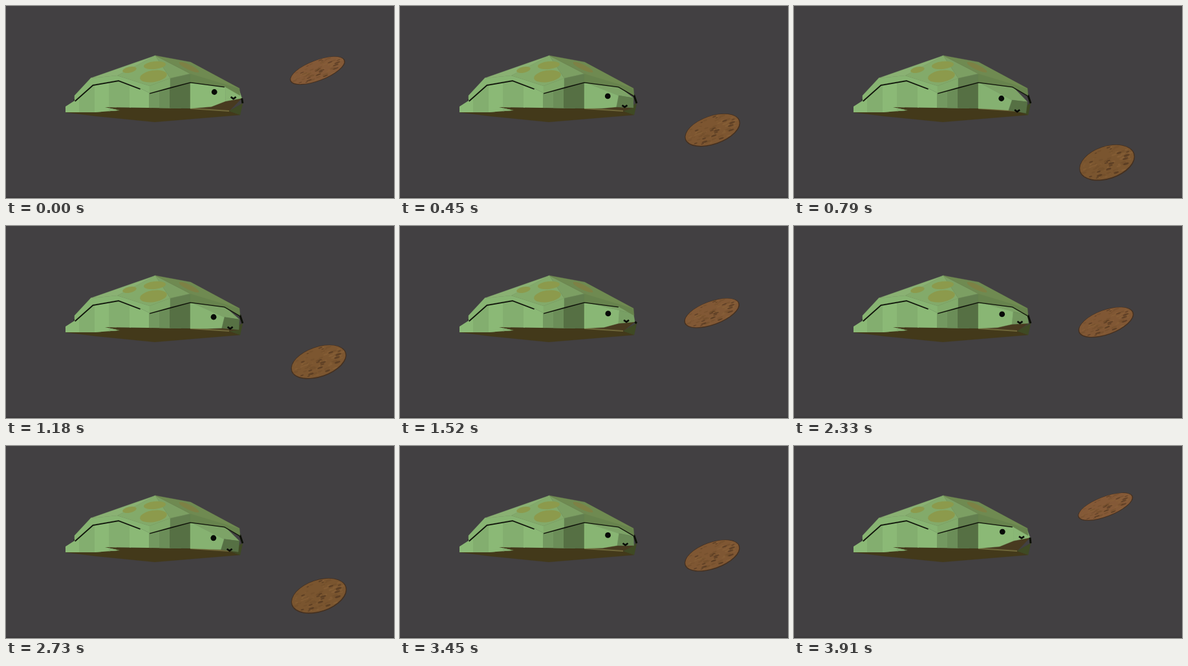
An HTML page with a canvas that plays this animation: 600x298 px, repeating every 3.94 s.

```html
<!DOCTYPE html>
<html>
<head>
<meta charset="utf-8">
<style>
html, body { margin: 0; width: 100%; height: 100%; overflow: hidden; background: #424042; }
canvas { display: block; }
</style>
</head>
<body>
<canvas id="stage" width="600" height="298"></canvas>
<script>
const g = document.getElementById('stage').getContext('2d');
const LOOP = 3940, PERIOD = 2075, LOWEST = 858;

// Corners of the low-poly turtle
const P = {
  apex: [231, 77], ridge: [285, 87], brink: [361, 128], end: [362, 139],
  crown: [188, 92], flank: [131, 112], back: [106, 139], backLow: [106, 147],
  fold: [172, 108], mid: [222, 124], midLow: [222, 135], joint: [254, 112], jointLow: [254, 126],
  front: [285, 105], frontLow: [285, 118], rim: [338, 125], bend: [134, 122], arch: [174, 115],
  slit: [208, 128], beak: [366, 151],
  tail: [92, 156], tailLow: [92, 165], hand: [136, 165], palm: [176, 162], notch: [153, 157],
  neck: [285, 159], belly: [230, 180], hip: [140, 171], chin: [362, 169], jaw: [345, 163]
};

const mix = (a, b, k) => a + (b - a) * k;
const clamp = v => Math.max(0, Math.min(1, v));
const blend = (a, b, k) => a.map((v, i) => mix(v, b[i], k));
const rgb = (a, b, k) => `rgb(${blend(a, b, clamp(k)).map(Math.round)})`;
const LIGHT = [139, 185, 118], DARK = [86, 112, 68];

function outline(names) {
  g.beginPath();
  for (const n of names.split(' ')) g.lineTo(...P[n]);
}

function face(color, names) {
  outline(names);
  g.closePath();
  g.fillStyle = g.strokeStyle = color;
  g.lineWidth = 0.4;
  g.fill();
  g.stroke();
}

function line(color, width, names) {
  outline(names);
  g.strokeStyle = color;
  g.lineWidth = width;
  g.stroke();
}

function oval(color, x, y, rx, ry, turn = 0) {
  g.fillStyle = color;
  g.beginPath();
  g.ellipse(x, y, rx, ry, turn, 0, 7);
  g.fill();
}

function body() {
  face('#43391a', 'tailLow notch neck jaw chin belly hip');
  g.save();
  outline('tail backLow bend arch slit midLow frontLow neck notch palm hand tailLow');
  g.clip();
  // upright facets, darker towards the neck
  [92, 114, 138, 160, 192, 222, 238, 254].forEach((x, i) => {
    g.fillStyle = rgb(LIGHT, DARK, i % 2 * 0.15 + Math.max(0, i - 4) * 0.3);
    g.fillRect(x - 1, 110, 34, 60);
  });
  g.restore();
}

function head(p) {
  const move = (name, x0, y0, x1, y1) => P[name] = [mix(x0, x1, p), mix(y0, y1, p)];
  move('brow', 340, 125, 337, 145);
  move('snout', 361, 131, 361, 148);
  move('lip', 365, 142, 359, 165);
  move('corner', 340, 147, 332, 161);
  move('cheek', 318, 156, 310, 160);
  const eye = move('eye', 322.3, 133, 320.8, 143), [x, y] = move('nose', 352, 143, 345.5, 163);

  face('#3f4a24', 'jaw beak chin');
  face('#483a20', 'neck corner lip jaw');
  line('#6f683a', 2, 'neck jaw');
  face('#7da367', 'frontLow rim snout brow');
  face(rgb(LIGHT, DARK, p * 1.2), 'brow snout lip corner');
  face(rgb(LIGHT, DARK, p * 0.1), 'frontLow brow corner cheek neck');
  oval('#080a07', ...eye, 4.4, 4.4);
  g.strokeStyle = '#080a07';
  g.lineWidth = 2.7;
  g.beginPath();
  for (const d of [-4, 0, 4]) g.lineTo(x + d, y - Math.abs(d) * 0.7);
  g.stroke();
}

function shell(p) {
  line('#0d1008', 4, 'backLow bend arch slit');
  line('#0d1008', 3, 'midLow frontLow rim');
  line('#0d1008', 3, p < 0.3 ? 'lip beak' : 'rim end beak');
  face('#87b472', 'back flank fold mid midLow slit arch bend backLow');
  face('#82ab6b', 'mid joint jointLow midLow');
  face('#637f4f', 'joint front frontLow jointLow');
  face('#67834d', 'front ridge brink end rim frontLow');
  face('#83aa6a', 'apex joint mid fold');
  face('#8ab173', 'apex fold flank crown');
  face('#7c9f63', 'apex front joint');
  face('#6f8a51', 'apex ridge brink front');
  oval('#8c9a4c', 230, 92, 17, 6, -0.1);
  oval('#8c9a4c', 228, 109, 21, 9, -0.15);
  oval('#8c9a4c', 191, 99, 11, 4.5, -0.2);
  oval('#7d8145', 283, 95, 17, 4, 0.45);
}

function cookie(y, p) {
  let seed = 11;
  const rnd = () => (seed = seed * 16807 % 2147483647) / 2147483647;
  g.save();
  g.translate(mix(481.6, 484, p), y);
  g.rotate(mix(-0.366, -0.325, p));
  g.scale(mix(45.2, 44.6, p), mix(15.6, 25.2, p));
  oval('#443020', 0, 0, 1, 1);
  oval(rgb([132, 89, 55], [122, 85, 47], p), 0, -0.02, 0.97, 0.95);
  g.globalAlpha = 0.5;
  for (let i = 0; i < 90; i++) {
    const a = rnd() * 6.283, r = Math.sqrt(rnd()) * 0.88, s = 0.02 + rnd() * 0.05;
    oval(i < 40 ? '#8c633a' : i < 70 ? '#6e4c2a' : '#3f2a1a', r * Math.cos(a), r * Math.sin(a), s * 1.6, s);
  }
  g.restore();
}

function frame(now) {
  const t = now % LOOP;
  // swings up and down while sinking slightly
  const y = 166.5 + t / 1000 + 77.5 * Math.cos((t - LOWEST) / PERIOD * 2 * Math.PI);
  const p = (y - 93) / 143;
  g.fillStyle = '#424042';
  g.fillRect(0, 0, 600, 298);
  g.fillStyle = '#3b393a';
  g.fillRect(0, 296, 600, 2);
  body();
  head(p);
  shell(p);
  cookie(y, p);
  requestAnimationFrame(frame);
}
frame(0);
</script>
</body>
</html>
```
